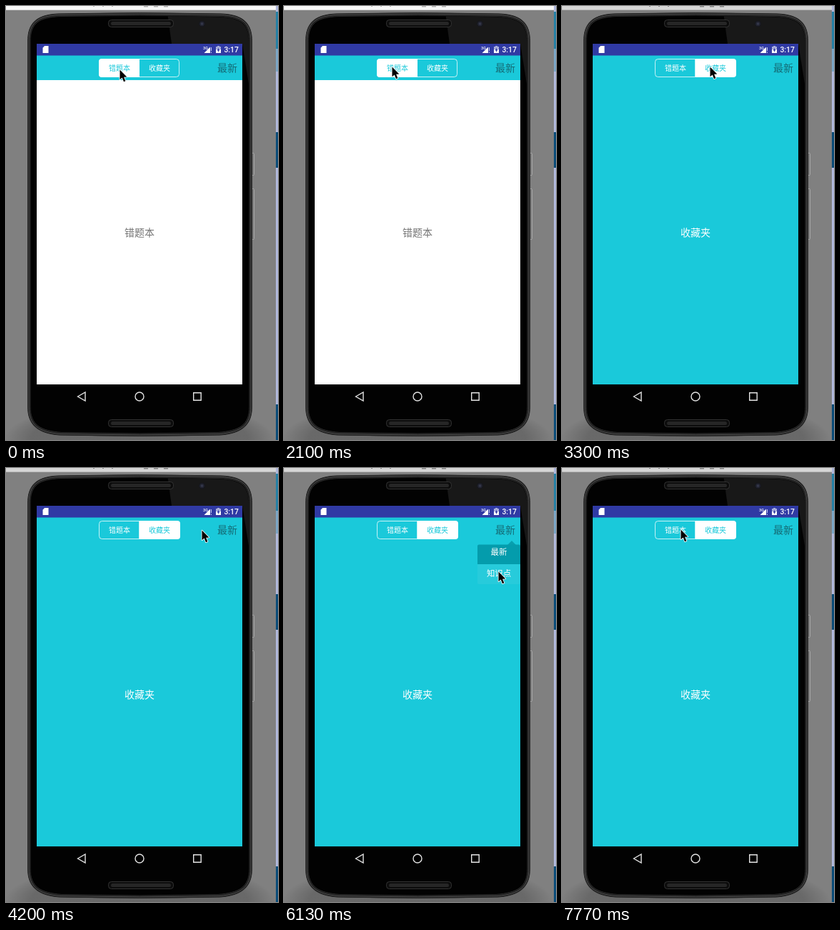
An HTML page with a canvas that plays this animation: 381x609 px, repeating every 8000 ms.

```html
<!DOCTYPE html>
<html lang="zh-CN">
<head>
<meta charset="utf-8">
<title>Tab switch</title>
<style>
html, body { margin: 0; width: 100%; height: 100%; overflow: hidden; background: #808080; }
canvas { display: block; width: 381px; height: 609px; }
</style>
</head>
<body>
<canvas id="stage"></canvas>
<script>
const W = 381, H = 609, LOOP = 8000, TICK = 150;
const TEAL = '#1ac9da', CJK = '"Noto Sans CJK SC", "Noto Sans CJK", sans-serif';
const SCREEN = { x: 43, y: 53, w: 288, h: 478 };
const MID = SCREEN.x + SCREEN.w / 2;
const canvas = document.getElementById('stage');
const dpr = window.devicePixelRatio || 1;
canvas.width = W * dpr;
canvas.height = H * dpr;
const c = canvas.getContext('2d');
c.scale(dpr, dpr);

function paint(fill, stroke, line = 1) {
  if (fill) { c.fillStyle = fill; c.fill(); }
  if (stroke) { c.strokeStyle = stroke; c.lineWidth = line; c.stroke(); }
}

function rect(x, y, w, h, fill) {
  c.fillStyle = fill;
  c.fillRect(x, y, w, h);
}

function round(x, y, w, h, r, ...style) {
  c.beginPath();
  c.roundRect(x, y, w, h, r);
  paint(...style);
}

function circle(x, y, r, ...style) {
  c.beginPath();
  c.arc(x, y, r, 0, Math.PI * 2);
  paint(...style);
}

function poly(points, ...style) {
  c.beginPath();
  points.forEach(([x, y]) => c.lineTo(x, y));
  c.closePath();
  paint(...style);
}

// Text centred on (x, y), on a whole-pixel baseline
function label(str, x, y, size, color) {
  c.font = `${size}px ${CJK}`;
  c.textAlign = 'center';
  c.fillStyle = color;
  c.fillText(str, x, Math.round(y + size * 0.38));
}

function shadow() {
  const g = c.createRadialGradient(0, 0, 0.8, 0, 0, 1);
  g.addColorStop(0, 'rgba(70,70,70,.4)');
  g.addColorStop(1, 'rgba(70,70,70,0)');
  c.save();
  c.translate(MID, H);
  c.scale(190, 55);
  circle(0, 0, 1, g);
  c.restore();
}

function desktop(focused) {
  rect(0, 0, W, H, '#808080');
  shadow();
  rect(0, 0, 378, 5, focused ? '#d6d6d6' : '#f7f7f7');
  rect(0, 5, 378, 1, focused ? '#b4b4b4' : '#d4d4d4');
  // Lower tips of the title text
  const ink = focused ? '#888' : '#b5b5b5';
  for (let i = 0; i < 3; i++) {
    rect(122 + 13 * i, 0, 2, 1, ink);
    rect(193 + 14 * i, 0, 6, 1.5, ink);
  }
  // Edge of the wallpaper
  rect(378, 0, 3, H, '#b0b8dc');
  rect(378, 8, 3, 52, '#2680a5');
  rect(378, 60, 3, 32, '#7ba6c6');
  for (const y of [177, 559]) rect(378, y, 3, 50, '#0b4c78');
}

// Phone outline, shrunk by d on every side
function shell(d, ...style) {
  const l = 30 + d, r = 345 - d, t = 9 + d, b = 604 - d;
  c.beginPath();
  c.moveTo(l, 50);
  c.bezierCurveTo(l, 24, l + 12, t + 3, l + 42, t + 1.5);
  c.quadraticCurveTo(MID, t - 1.5, r - 42, t + 1.5);
  c.bezierCurveTo(r - 12, t + 3, r, 24, r, 50);
  c.lineTo(r, 562);
  c.bezierCurveTo(r, 588, r - 14, b - 4, r - 44, b - 1.5);
  c.quadraticCurveTo(MID, b + 1.5, l + 44, b - 1.5);
  c.bezierCurveTo(l + 14, b - 4, l, 588, l, 562);
  c.closePath();
  paint(...style);
}

function speaker(y) {
  round(143.5, y + 0.5, 91, 10, 4, '#0c0c0c', '#333');
  round(147, y + 3, 84, 5, 2.5, '#262626');
}

function phone() {
  for (const [y, h] of [[206, 31], [256, 71]]) round(343.5, y + 0.5, 4, h, 1, '#777', '#a8a8a8');
  shell(0.5, '#1c1c1c', '#242424');
  shell(2, null, '#5e5e5e', 0.8);
  shell(4, '#020202', '#2c2c2c');
  // Glare across the top right of the glass
  c.save();
  shell(5);
  c.clip();
  poly([[226, 9], [345, 9], [345, 140], [331, 53], [232, 53]], '#181818');
  c.restore();
  speaker(19);
  speaker(580);
  circle(274.5, 25, 4, '#22242f', '#14151c');
  circle(274.5, 25, 1.8, '#34374c');
}

function navBar() {
  const style = [null, '#e4e4e4', 1.4], y = 548;
  poly([[100.5, y], [111, y - 6], [111, y + 6]], ...style);
  circle(MID, y, 6, ...style);
  round(MID + 75.7, y - 5.3, 10.5, 10.5, 0, ...style);
}

function statusBar() {
  rect(SCREEN.x, SCREEN.y, SCREEN.w, 16.5, '#303aa4');
  poly([[54, 56], [59.5, 56], [59.5, 66], [51.5, 66], [51.5, 58.8]], '#fff');
  c.textAlign = 'left';
  c.fillStyle = '#fff';
  c.font = '500 5.5px Roboto, sans-serif';
  c.fillText('3G', 276, 60.5);
  poly([[286, 57.5], [286, 66], [277.5, 66]], '#fff');
  rect(287, 58, 1, 5, '#c9cdf0');
  rect(287, 64.5, 1, 1.5, '#c9cdf0');
  rect(296, 56, 3, 1, '#a9aedb');
  rect(294, 57, 7, 4, '#a9aedb');
  rect(294, 61, 7, 5, '#fff');
  poly([[298, 58.5], [295.5, 62.5], [297, 62.5], [297, 65], [299.5, 61], [298, 61]], '#303aa4');
  c.fillStyle = '#fff';
  c.font = '500 10.3px Roboto, sans-serif';
  c.fillText('3:17', 305.5, 65);
}

function tabs(active) {
  const line = 'rgba(255,255,255,.75)';
  round(130.5, 74.5, 112, 25, 4, null, line);
  rect(186, 75, 1, 24, line);
  ['错题本', '收藏夹'].forEach((name, i) => {
    const on = i === active, x = 130 + 56 * i + (on ? i : 0);
    if (on) round(x, 74, 57, 26, i ? [0, 4, 4, 0] : [4, 0, 0, 4], '#fff');
    label(name, 159 + 56 * i, 87, 10, on ? TEAL : '#fff');
  });
  label('最新', 310, 87, 14, '#156a74');
}

function app(active) {
  const { x, y, w, h } = SCREEN;
  rect(x, y, w, h, active ? TEAL : '#fff');
  rect(x, y + 16, w, 35, TEAL);
  statusBar();
  tabs(active);
  label(active ? '收藏夹' : '错题本', MID, 318, 14, active ? '#fff' : '#757575');
}

function menu() {
  poly([[319, 102], [325, 108], [313, 108]], '#089fae');
  round(271, 107.5, 60, 27.5, [2, 2, 0, 0], '#049cac');
  round(271, 135, 60, 28, [0, 0, 2, 2], '#27cbdb');
  label('最新', 301, 118, 11.4, '#fff');
  label('知识点', 301, 147.5, 11.4, '#fff');
}

function cursor([x, y]) {
  const arrow = [[0, 0], [0, 13.8], [3.2, 11], [5.5, 16.7], [7.9, 15.7], [5.6, 10.2], [9.8, 10]];
  c.save();
  c.translate(Math.round(x) + 0.5, Math.round(y) + 0.5);
  c.lineJoin = 'round';
  poly(arrow, '#000', '#fff', 1.6);
  poly(arrow, '#000');
  c.restore();
}

// Pointer moves: first step, last step, destination
const START = [159, 89];
const MOVES = [
  [600, 750, 162, 91],
  [1650, 2100, 151, 85],
  [2550, 3000, 207, 85],
  [3750, 4500, 307, 88],
  [4800, 4940, 302, 128],
  [5240, 5390, 300, 146],
  [6130, 6130, 300, 145],
  [6580, 6730, 217, 83],
  [7620, 7770, 166, 86]
];

function pointer(t) {
  let [x, y] = START;
  for (const [from, to, tx, ty] of MOVES) {
    if (t < from) break;
    const hops = Math.round((to - from) / TICK) + 1;
    const done = t >= to ? hops : Math.floor((t - from) / TICK) + 1;
    x += (tx - x) * done / hops;
    y += (ty - y) * done / hops;
  }
  return [x, y];
}

function draw(t) {
  desktop(t >= 2250);
  phone();
  app(t >= 3300 ? 1 : 0);
  navBar();
  if (t >= 4650 && t < 7330) menu();
  cursor(pointer(t));
}

const began = performance.now();
function tick() {
  draw((performance.now() - began) % LOOP);
  requestAnimationFrame(tick);
}
tick();
</script>
</body>
</html>
```
